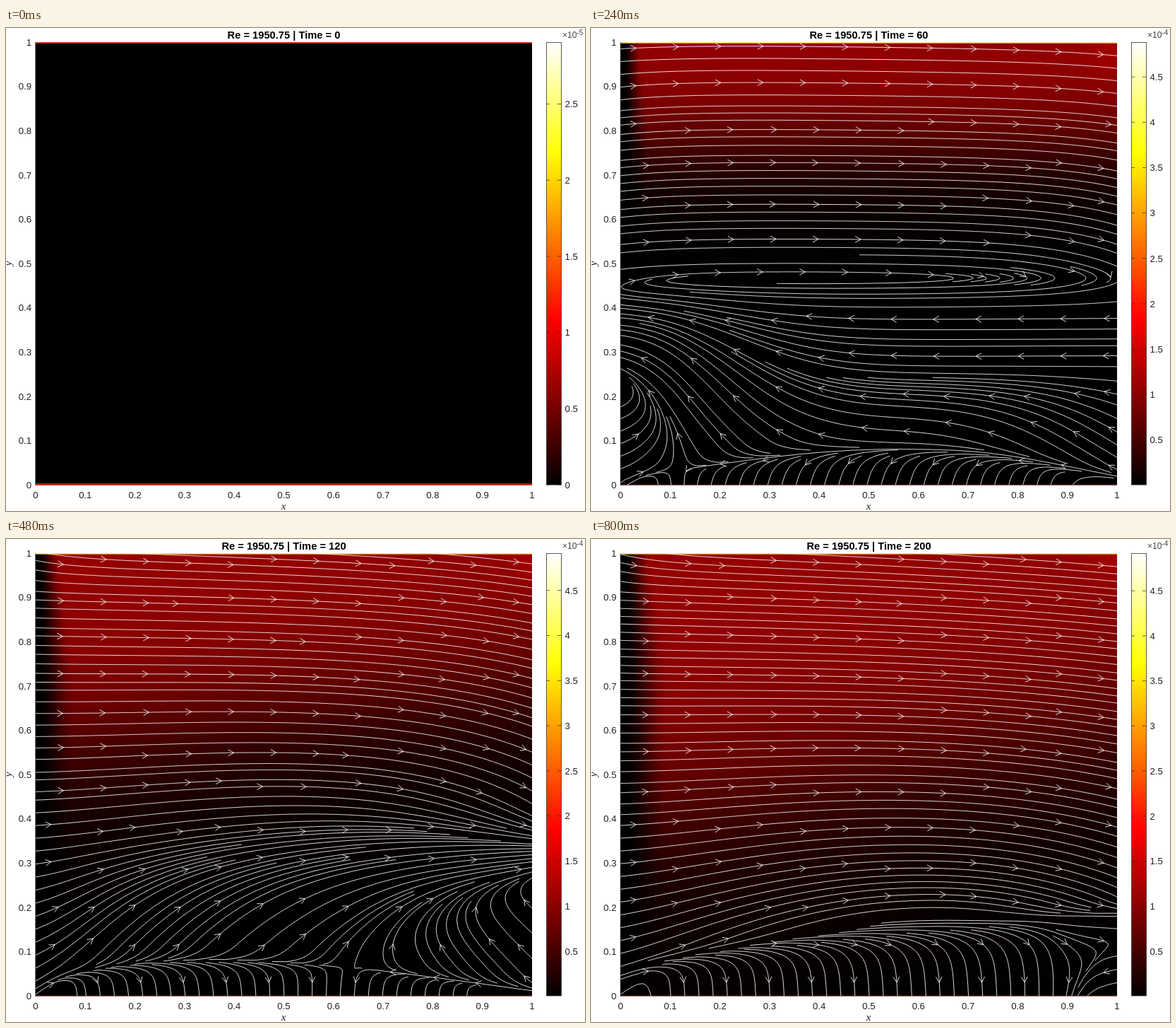
An HTML page with a canvas for the animation above (880 ms loop, 820 by 683 pixels).

```html
<!DOCTYPE html>
<html lang="en">
<head>
<meta charset="utf-8">
<title>Flow field</title>
<style>
html, body { margin: 0; width: 100%; height: 100%; overflow: hidden; background: #fff; }
#heat { position: absolute; left: 42px; top: 20px; width: 703px; height: 626px; }
svg { position: absolute; left: 0; top: 0; }
text { font: 13.2px "Liberation Sans", Arial, sans-serif; fill: #222; }
.title { font-size: 14.7px; font-weight: bold; fill: #000; }
.math { font: italic 15px "Liberation Serif", serif; }
.factor { font-size: 12px; fill: #444; }
.factor tspan { font-size: 10px; }
</style>
</head>
<body>
<canvas id="heat" width="176" height="157"></canvas>
<svg width="820" height="683" viewBox="0 0 820 683">
  <defs>
    <linearGradient id="hot" x1="0" y1="1" x2="0" y2="0">
      <stop offset="0" stop-color="#000"/><stop offset=".375" stop-color="#f00"/>
      <stop offset=".75" stop-color="#ff0"/><stop offset="1" stop-color="#fff"/>
    </linearGradient>
    <clipPath id="box"><rect x="42" y="20" width="703" height="626"/></clipPath>
  </defs>
  <rect id="top" x="42" y="20" width="703"/>
  <rect id="base" x="42" width="703"/>
  <path id="flow" clip-path="url(#box)" fill="none" stroke="#fff" stroke-width=".85"/>
  <path id="heads" fill="none" stroke="#fff" stroke-width=".85"/>
  <path d="M41.5 20V646.5H745" fill="none" stroke="#222" stroke-width=".6"/>
  <rect x="765.5" y="20.5" width="21" height="625.5" fill="url(#hot)" stroke="#333" stroke-width=".8"/>
  <g id="axes"></g>
  <g id="scale"></g>
  <text id="title" class="title" x="393.5" y="15.3" text-anchor="middle"></text>
  <text class="math" x="393" y="681" text-anchor="middle">x</text>
  <text class="math" transform="translate(8 333) rotate(-90)" text-anchor="middle">y</text>
  <text class="factor" x="788" y="14">×10<tspan id="power" dy="-4"></tspan></text>
</svg>
<script>
const W = 703, H = 626, LEFT = 42, BOTTOM = 646;
const { exp, tanh, sin, min, max, floor, hypot, PI } = Math;
const el = id => document.getElementById(id);
const px = x => LEFT + W * x, py = y => BOTTOM - H * y;
const mix = (a, b, k) => a + (b - a) * k;
const clamp = k => min(1, max(0, k));
const bell = k => exp(-k * k);

function ease(a, b, x) {
  const k = clamp((x - a) / (b - a));
  return k * k * (3 - 2 * k);
}

// Value at time t, straight between a few { time: value } points.
function key(t, points) {
  const at = Object.keys(points).map(Number);
  if (t <= at[0]) return points[at[0]];
  for (let i = 1; i < at.length; i++)
    if (t <= at[i]) return mix(points[at[i - 1]], points[at[i]], (t - at[i - 1]) / (at[i] - at[i - 1]));
  return points[at[at.length - 1]];
}

// Flow at time t: a sheared upper stream, a return flow below it and a sinking wall layer.
function fieldAt(t) {
  // height, tilt, left dip and softness of the line where the flow turns back
  const mid = key(t, { 20: .37, 40: .4, 60: .467, 100: .335, 140: .16, 180: .12, 200: .13 });
  const tilt = key(t, { 60: 0, 100: .21, 140: .8 });
  const dip = key(t, { 40: .09, 60: .02, 100: 0 });
  const soft = key(t, { 60: .02, 100: .08, 200: .06 });
  // rising plume, updraft at the right, entry slopes at the left
  const plume = key(t, { 40: 1.3, 100: 1, 140: 0 });
  const spread = key(t, { 40: .15, 60: .25, 100: .9 });
  const roof = key(t, { 40: .4, 60: .47, 100: .36 });
  const updraft = key(t, { 60: .6, 100: 0, 140: 1.2, 180: .6, 200: 0 });
  const climb = key(t, { 60: 0, 100: .6, 140: 1, 200: .72 });
  const entry = key(t, { 40: .14, 60: .12, 100: 0 });
  // downward bend of the stream at the right
  const fall = key(t, { 40: .2, 60: .42, 100: 1, 140: .33, 180: .22, 200: .65 });
  const fallY = key(t, { 40: .6, 60: .47, 100: .37, 140: .45, 180: .25, 200: .15 });
  const bend = key(t, { 40: 8, 60: 6, 100: 4, 140: 2.5 });
  const slope = key(t, { 40: 0, 100: .04, 200: .05 });
  // wall layer
  const hump = key(t, { 60: 1, 100: .7 });
  const lid = key(t, { 140: 0, 180: .35, 200: 1 });
  const lean = key(t, { 60: .25, 140: .05 });

  return (x, y) => {
    const layer = mix(.01 + .072 * sin(PI * x ** hump), .18 * x ** .45 + .01, lid);
    const turn = mid - tilt * (1 - x) - dip * exp(-x / .07);
    const side = .12 * (1 - (y / .235) ** 2);
    const corner = bell(x / .045), right = ease(.85, 1, x);
    let u = max(tanh((y - turn) / soft), tanh((side - x) / .05));

    if (y < layer) {
      const k = y / layer;
      u *= max(corner, lean + .8 * right + (1 - lean) * k ** 3);
      return [u, (k - 1) * (1 - .8 * right) * (1 - corner) + .7 * corner];
    }
    let v = plume * bell((x - .11) / spread) * (1 - ease(.35 * roof, roof, y)) * ease(-.1, .15, x);
    v += updraft * ease(.5, .95, x) * (1 - ease(.1, .28, y));
    v += climb * exp(-y / .22) * (.54 + 6.7 * x) * exp(-3.2 * x);
    v += entry * exp(-x / .12) * ease(turn - .1, turn, y);
    v -= fall * exp(-max(0, y - fallY) / .3) * ease(fallY - .1, fallY + .05, y) * x ** bend;
    v -= slope * y + 4 * slope * exp(-x / .08) * ease(.88, 1, y);
    return [u, v * mix(ease(-.01, .04, y - layer), 1, corner)];
  };
}

// Evenly spaced streamlines: seed every free coarse cell, stop at fine cells already taken.
const N = 35, FINE = 140, STEP = 2, HEAD = 8;

function streamlines(t) {
  const field = fieldAt(t);
  const seeded = new Uint8Array(N * N), marked = new Uint8Array(N * N), taken = new Uint16Array(FINE * FINE);
  const slot = (k, n) => min(n - 1, floor(k * n));
  const cell = (x, y, n) => slot(y, n) * n + slot(x, n);
  let lines = "", heads = "";

  function head(x, y, dx, dy) {
    const l = hypot(dx, dy), ux = dx / l * HEAD, uy = dy / l * HEAD;
    const wing = s => (x - ux + s * uy * .55).toFixed(1) + " " + (y - uy - s * ux * .55).toFixed(1);
    heads += `M${wing(1)}L${x.toFixed(1)} ${y.toFixed(1)}L${wing(-1)}`;
  }

  function trace(x, y, sign, id) {
    const pts = [];
    for (let n = 0; n < 450; n++) {
      pts.push(px(x).toFixed(1) + " " + py(y).toFixed(1));
      if (x < 0 || x > 1 || y < 0 || y > 1) break;
      const coarse = cell(x, y, N), fine = cell(x, y, FINE);
      seeded[coarse] = 1;
      if (taken[fine] && taken[fine] !== id) break;
      taken[fine] = id;
      const [u, v] = field(x, y), speed = hypot(u, v);
      if (speed < .02) break;
      if (n && slot(x, N) % 3 === 1 && slot(y, N) % 3 === 1 && !marked[coarse]) {
        marked[coarse] = 1;
        head(px(x), py(y), u, -v);
      }
      const h = sign * STEP, half = h / 2 / speed;
      const [mu, mv] = field(clamp(x + u * half / W), clamp(y + v * half / H));
      const ms = hypot(mu, mv) || 1;
      x += mu / ms * h / W;
      y += mv / ms * h / H;
    }
    if (pts.length > 1) lines += "M" + pts.join("L");
  }

  for (let i = 0; i < N * N; i++) {
    if (seeded[i]) continue;
    const x = (i % N + .5) / N, y = (floor(i / N) + .5) / N;
    trace(x, y, 1, i + 1);
    trace(x, y, -1, i + 1);
  }
  return { lines, heads };
}

// A warm layer spreads down from the top; the left edge stays cold.
const ctx = el("heat").getContext("2d");

function drawHeat(t) {
  const { width: w, height: h } = ctx.canvas;
  const img = ctx.createImageData(w, h);
  const front = key(t, { 20: .92, 40: .86, 60: .77, 100: .66, 140: .57, 200: .48 });
  const soft = key(t, { 20: .025, 40: .035, 60: .06, 100: .09, 200: .12 });
  const tilt = key(t, { 60: 0, 100: .1, 140: .22 });
  const edge = mix(.05, .1, t / 200);
  for (let p = 0; t && p < w * h; p++) {
    const x = (p % w + .5) / w, y = 1 - (floor(p / w) + .5) / h;
    const warm = 150 / (1 + exp((front + tilt * (x - .4) - y) / soft));
    const cold = ease(.005, edge * (.6 + .4 * min(1, 4 * (1 - y))), x);
    img.data[4 * p] = warm * cold + 18 * bell((1 - x) / .06) * bell((1 - y) / .08);
  }
  for (let p = 3; p < img.data.length; p += 4) img.data[p] = 255;
  ctx.putImageData(img, 0, 0);
}

const label = (x, y, s, anchor) => `<text x="${x}" y="${y}" text-anchor="${anchor}">${s}</text>`;
let axes = "";
for (let i = 0; i <= 10; i++)
  axes += label(px(i / 10), 664.5, i / 10, "middle") + label(36, py(i / 10) + 4.8, i / 10, "end");
el("axes").innerHTML = axes;

function scaleMarks(t) {
  const gap = t ? 63.7 + .9 * exp(-(t - 40) / 30) : 107.7;
  let out = "";
  for (let i = t ? 1 : 0; i <= (t ? 9 : 5); i++) {
    const y = BOTTOM - gap * i + (t ? .6 : 0);
    out += `<path d="M766 ${y}h4M786 ${y}h-5" stroke="#222" stroke-width=".7"/>` + label(791.5, y + 4.8, i / 2, "start");
  }
  return out;
}

function bar(id, y, height, fill) {
  const r = el(id);
  r.setAttribute("y", y);
  r.setAttribute("height", height);
  r.setAttribute("fill", fill);
}

const stages = Array.from({ length: 11 }, (_, i) => i ? streamlines(i * 20) : { lines: "", heads: "" });

function show(i) {
  const t = i * 20;
  drawHeat(t);
  el("flow").setAttribute("d", stages[i].lines);
  el("heads").setAttribute("d", stages[i].heads);
  el("title").textContent = "Re = 1950.75 | Time = " + t;
  el("power").textContent = t ? "-4" : "-5";
  el("scale").innerHTML = scaleMarks(t);
  bar("top", 20, t ? 1.6 : 2, t ? "#ffe278" : "#b83010");
  bar("base", t ? 645 : 644, t ? 1 : 2, t ? "#500000" : "#d01800");
}

let shown = -1;
const start = performance.now();
function tick() {
  const i = floor((performance.now() - start) % 880 / 80);
  if (i !== shown) show(shown = i);
  requestAnimationFrame(tick);
}
tick();
</script>
</body>
</html>
```
